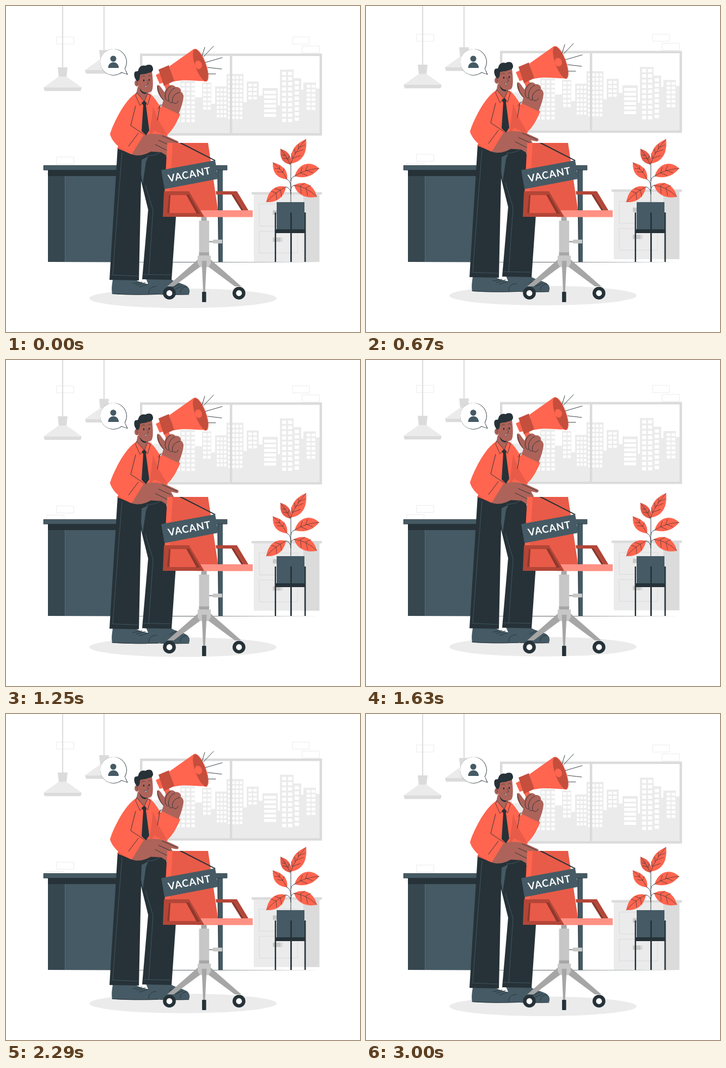
An HTML page that plays this animation: 650 by 600 pixels, repeating every 3.04 s.

```html
<!DOCTYPE html>
<html lang="en">
<head>
<meta charset="utf-8">
<title>Vacant position</title>
<style>
html, body { margin: 0; width: 100%; height: 100%; overflow: hidden; background: #fff; }
svg { display: block; width: 650px; height: 600px; }
.red { fill: #ff654f; } .red2 { fill: #e85b48; } .red3 { fill: #c54e3d; } .red4 { fill: #b34638; } .red5 { fill: #8d382d; }
.ink { fill: #263238; } .slate { fill: #455a64; } .skin { fill: #ad6359; }
.g1 { fill: #ebebeb; } .g2 { fill: #dbdbdb; } .g3 { fill: #c7c7c7; } .g4 { fill: #a6a6a6; }
.line { fill: none; stroke: #263238; stroke-width: .9; stroke-linecap: round; stroke-linejoin: round; }
.thin { stroke-width: .65; }
.seam { fill: none; stroke: #455a64; stroke-width: .9; }
.box { fill: none; stroke: #ececec; stroke-width: 1; }
text { font: 700 18.5px Lato, "Open Sans", sans-serif; letter-spacing: .9px; fill: #fff; text-anchor: middle; }
</style>
</head>
<body>
<svg viewBox="0 0 650 600">
  <defs>
    <g id="lamp">
      <path class="g2" d="M103-20h2V114h-2zM95 113h18l-2 18H97zM69 150h70l-2 6.500H71z"/>
      <path class="g1" d="M97 130h14l28 20H69z"/>
    </g>
  </defs>

  <!-- Room -->
  <g class="float">
    <path class="box" d="M92.500 57h32v13h-32zM526 57h31v13h-31zM543.500 73.500h32v13h-32zM92.500 278h32v13h-32zM74.500 295h32v13h-32z"/>
    <use href="#lamp"/><use href="#lamp" x="76" y="-32"/>
    <path fill="#fff" d="M248 90h330v146H248z"/>
    <path class="g1" d="M250 150h18v14h52v-26h27v30h13v-27h17v39h7v-32h21v-23h31v52h6v-38h22v26h7v-14h28v32h4v-66h25v16h14v21h4v-13h23v11h7v82H250z"/>
    <g id="city" fill="none" stroke="#fff"></g>
    <path fill="none" stroke="#dbdbdb" stroke-width="4.500" d="M248.200 89.700H578v146.500H248.200zM413.200 90v146"/>
    <path class="g1" d="M455 346h92v125h-92z"/>
    <path class="g2" d="M546 346h29.500v125H546zM451 342.500h129v4.500H451z"/>
    <path fill="none" stroke="#dbdbdb" d="M465 364.500h70.500v40.500H465zM465 414.500h70.500v40H465z"/>
    <path class="g3" d="M490 376h14v8h-14zM490 426h14v8h-14z"/>
    <path class="g2" d="M504 376h4v8h-4zM504 426h4v8h-4z"/>
    <ellipse class="g1" cx="325" cy="538" rx="172" ry="18"/>
  </g>

  <path class="ink" d="M77 471.300L326 470.900 576 471.300 326 471.700z"/>

  <!-- Desk -->
  <path class="slate" d="M108 302h96v169h-96zM389 302h9v169h-7z"/>
  <path fill="#37474f" d="M77 302h31v169H77zM388 302h2l2 169h-2z"/>
  <path fill="none" stroke="#607580" stroke-width=".7" d="M108.500 313v158"/>
  <path class="ink" d="M77 302h127v11H77z"/>
  <path class="slate" stroke="#263238" stroke-width=".7" d="M69 293.400h337v8.600H69z"/>

  <!-- Man -->
  <g class="float">
    <path class="slate" d="M257 502h45c8 8 29 8 34 18 2 5 1 9-1 11-22 1-48 1-67-3z"/>
    <path class="line" d="M271 530c22 2 45 1 65 1M300 515l12-6M306 518l13-6M311 521l13-6M320 528c0-7 5-11 12-11"/>
    <path class="slate" d="M196 503h42c9 10 36 7 42 18 2 4 1 8-1 10-28 1-58 1-84-1-2-10 0-18 1-27z"/>
    <path class="line" d="M195 529.500c28 2 56 2 84 1M233 511l17-3M239 514l17-5M245 517l16-5M262 529c0-8 5-13 14-13"/>
    <path class="ink" d="M205 261h87l10 60 10 67-8 116-54-1 11-128-13-53-4 183-54-1z"/>
    <path class="slate" d="M249 283l12-6-4 10-6 41-3-18z"/>
    <path class="seam" d="M213 270l-7 90-10 134M194 495l48 2M256 330l14 46-8 119M252 494l50 1M258 276c16-1 22-4 28-9"/>

    <path class="red" d="M239 160C224 170 213 188 205 203Q194 224 191 236c5 18 25 31 39 37l8-8h51l8-29c8-6 17-22 23-37l-33-18-3 6c-5-9-13-21-20-26z"/>
    <path class="red2" d="M270 184l10 26 16 27-10-1-14-7-9 13 3-24zM204 262l3-5 25 11-3 4z"/>
    <path class="red" d="M191 235c7 20 26 34 41 38l21-37-26-18z"/>
    <path class="line" d="M238 184l-9 36 24 16M243 234l-18 24M278 210l5-28M291 184l21 11M286 181l-7 8"/>

    <path class="skin" d="M253 237c14-3 29-2 39 1l24 11c2 3 0 6-4 5l-9-2 5 9-8 15c-6 1-10-5-16-7l-18-1c-13 7-24 9-35 5z"/>
    <path class="line" d="M287 239l27 12M280 247l22 10M274 255l22 11"/>

    <path class="skin" d="M242 148h17l2 13-7 14-15-13z"/>
    <path class="ink" d="M245 150c4 8 9 10 15 9l-4 3c-6 0-10-5-11-12z"/>
    <path class="skin" d="M242 124l26-3c2 15 3 31-1 36-7 6-20 1-24-11z"/>
    <ellipse class="skin" cx="240.500" cy="142" rx="4.500" ry="6"/>
    <path class="ink" d="M241 139C235 133 234 124 237 121C239 119 241 122 243 118C244 111 251 108 256 110C260 107 268 107 269 112C272 118 268 123 262 123C255 126 250 125 246 127C246 133 245 137 241 139z"/>
    <path class="line thin" d="M249 131c2-3 4-3 6-1M261 129c2-2 4-2 5 0M259 137l3 6-3 1M239 140c3 1 3 3 1 5"/>
    <ellipse class="ink" cx="253" cy="137" rx="1.300" ry="2"/><ellipse class="ink" cx="263" cy="136" rx="1.300" ry="2"/>
    <path fill="#fff" stroke="#263238" stroke-width=".6" d="M254 146.500c2 1 3 1 5 .5 0 3-4 3-5-.5z"/>
    <path class="red" stroke="#263238" stroke-width=".8" d="M240 159l14 17-8 7-8-18zM260 161l-6 15 6 6 5-17z"/>
    <path class="ink" d="M249 178l5-4 4 4-1 5 6 46-6 9-8-8 3-47z"/>

    <path class="skin" d="M286 184l3-10c-8-8-14-20-11-28 5-3 8 9 15 14l4-11c4-5 11-4 14 0 8-1 11 5 10 9 5 2 6 9 4 15-1 7-4 15-8 26z"/>
    <path class="red" d="M290 145l9-3 6 13-9 4z"/>
    <path class="red" d="M300 111l45-32c5 0 25 50 25 59-18 1-42-4-62 1z"/>
    <path class="red" d="M275 127l8-4 7 18-8 2z"/>
    <path class="red3" d="M280 117l19-8 10 29-19 9z"/>
    <ellipse cx="357" cy="109" rx="10" ry="31.500" transform="rotate(-20 357 109)" class="red3" stroke="#ff654f"/>
    <ellipse class="red" cx="353.500" cy="108.500" rx="6.500" ry="8" transform="rotate(-20 353 109)"/>
    <path class="line" d="M360 92l5-16M363 93l18-19M366 104l31-9M370 113l26 3M371 125l14 0"/>
    <path class="skin" d="M291 163c0-9 6-18 14-16 3 0 4 2 5 4 6-2 10 2 9 8 6 1 7 8 5 15l-6 13-18-4z"/>
    <path class="line" d="M278 147c2 12 5 20 12 27M293 171c-3-9 2-20 9-23M299 174c-3-10 4-21 11-23M306 177c-3-9 5-17 13-18M293 171c3 4 5 5 6 3M299 175c3 4 6 4 7 2M307 178c4 3 8 1 9-3"/>
  </g>

  <!-- Speech bubble, its outline thins out on the left -->
  <path class="ink" d="M210 122L223.800 126.500 218 114z"/>
  <circle class="ink" cx="197.500" cy="103.300" r="24.400"/>
  <path fill="#fff" d="M210 121L222 125.200 217 113z"/>
  <circle fill="#fff" cx="197" cy="103.100" r="24"/>
  <circle class="slate" cx="197" cy="97" r="5.500"/>
  <path class="slate" d="M187.500 114c0-14 19.500-14 19.500 0z"/>

  <!-- Plant -->
  <g class="red">
    <path d="M523 290C521 262 535 252 551 245C553 266 548 286 523 290zM516 319C497 317 489 306 490 288C506 292 519 302 516 319zM530 313C537 290 558 283 575 299C562 315 545 318 530 313zM514 333C496 328 482 338 478 361C494 362 510 355 514 333zM529 330C545 321 564 326 571 351C555 355 535 350 529 330z"/>
    <path class="red2" d="M522 292C504 288 503 275 504 263C516 266 527 276 522 292z"/>
  </g>
  <path class="line" stroke-width="1.500" d="M523 361V288M523 334C523 325 520 321 516 319M523 322C524 316 527 314 531 313M523 346C523 338 519 334 514 333M523 340C523 334 525 331 530 330"/>
  <path class="line thin" d="M523 290Q530 268 551 245M526 281l-2-10M531 272l-1-9M537 263v-8M527 280l14-5M533 269l13-5M539 260l10-4M522 292Q515 276 504 263M517 281l-8-1M513 275l-6-1M518 282l2-6M516 319Q506 300 490 288M508 306l-10-1M503 300l-9-1M508 306l3-7M502 299l1-6M530 313Q550 300 575 299M541 307l3-10M550 303l4-10M541 307l12 5M551 302l12 5M514 333Q495 342 478 361M504 339l-10-3M496 344l-9-3M504 339l2 12M496 345l1 11M529 330Q551 332 571 351M540 331l9-5M550 335l10-5M541 332l1 13M551 336l3 13"/>
  <path class="slate" d="M497 361h51v50h-51z"/>
  <path class="ink" d="M495 411h55v7h-55zM493.500 380h2.500v91h-2.500zM522 380h2.800v91H522zM548 380h2.500v91H548z"/>

  <!-- Chair -->
  <path class="g4" d="M353 466l-57 50h12l55-41zM375 466l57 50h-12l-55-41z"/>
  <path class="g4" d="M358.500 387h10v12h-10zM373 432.500h8v2.500h-8z"/>
  <path class="g3" d="M354.500 395h18.500v64h-18.500zM352 459.500h24v15l-5 6h-14l-5-6zM380 430h17v7h-17z"/>
  <path class="g4" d="M354.500 453.500h18.500v6h-18.500zM359.500 469h9l-3 59h-3.500z"/>
  <rect class="ink" x="360" y="526" width="7.500" height="19" rx="1"/>
  <g fill="#fff" stroke="#263238" stroke-width="6.400"><circle cx="300" cy="528.500" r="8.600"/><circle cx="427.800" cy="528.500" r="8.600"/></g>
  <path class="red" d="M296 252h75l-60 136h-22z"/>
  <path class="red2" d="M306 252h65l20 136h-93z"/>
  <path fill="#ff9184" d="M350 376h103v12.500H350z"/>
  <path class="red4" d="M385 341h39l21 35h-8l-18-29h-33z"/>
  <path class="red5" d="M414 347h5l18 29h-5z"/>
  <path class="red4" fill-rule="evenodd" d="M290 341h46l28 47h-76zM299 348l-2 33h53l-19-33z"/>
  <path class="red5" d="M331 347h5l20 35h-6zM299 348h3l-2 33h-4z"/>
  <path class="ink" d="M318 252h5l62 32-2 1z"/>
  <path class="line" d="M294 275l-5 18"/>
  <path class="slate" d="M285 302l99-18 6 34-99 19z"/>
  <text transform="translate(338 316.500) rotate(-10.800)">VACANT</text>
</svg>
<script>
// Facades: x, y, columns, rows, column pitch, row pitch, pane width
const facades = [
  [313, 142, 4, 9, 9.2, 8.300, 6], [362, 144, 2, 6, 8, 8.300, 6],
  [387, 152, 3, 7, 6.500, 8, 4.500], [408, 129, 4, 10, 7, 8.200, 5],
  [445, 143, 2, 4, 9, 8, 6.500], [474, 156, 1, 6, 0, 8.500, 22],
  [507, 121, 2, 10, 11, 9.600, 7.500], [530, 138, 1, 8, 0, 9.600, 8],
  [552, 145, 2, 6, 9, 8.200, 7]
];
document.getElementById("city").innerHTML = facades.map(([x, y, cols, rows, dx, dy, w]) =>
  Array.from({ length: cols }, (_, i) =>
    `<path stroke-width="${w}" stroke-dasharray="${dy * .64} ${dy * .36}" d="M${x + i * dx + w / 2} ${y}v${rows * dy}"/>`
  ).join("")).join("");

const LOOP = 3040, CYCLE = 3000, RISE = 11.3;
const floats = document.querySelectorAll(".float");
const start = performance.now();

function draw(now) {
  const p = Math.min(Math.max(now - start, 0) % LOOP / CYCLE, 1);
  const y = RISE * (Math.abs(2 * p - 1) - 1);
  floats.forEach(g => g.setAttribute("transform", `translate(0 ${y.toFixed(2)})`));
  requestAnimationFrame(draw);
}
draw(start);
</script>
</body>
</html>
```
